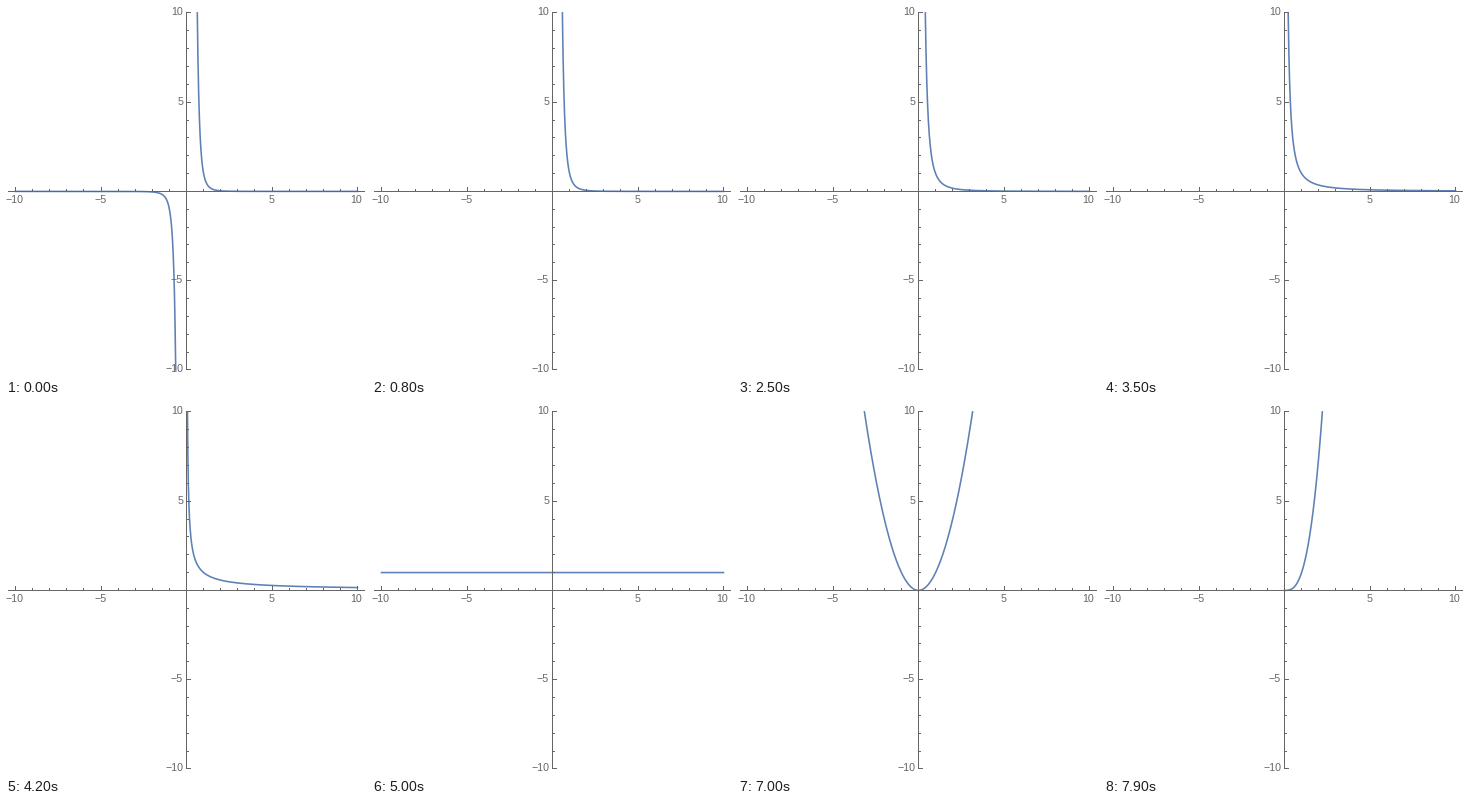
A matplotlib script for the animation above (8 s loop, 360 px wide and 371 px high).

```python
import numpy as np
import matplotlib.pyplot as plt
from matplotlib.animation import FuncAnimation

W, H, DPI = 360, 371, 100
PX = 72 / DPI                # points per pixel
CX, CY = 180.5, 185.4        # position of the coordinate origin
SX, SY = 17.1, 17.85         # pixels per unit
LIMIT = 10
FRAMES, INTERVAL = 80, 100
GRAY, BLUE = "#666666", "#5e81b5"

fig = plt.figure(figsize=(W / DPI, H / DPI), dpi=DPI, facecolor="white")
ax = fig.add_axes([0, 0, 1, 1])
ax.set(xlim=(0, W), ylim=(H, 0))
ax.axis("off")


def to_px(x, y):
    return CX + SX * x, CY - SY * y


def crisp(v):
    return np.floor(v) + 0.5


def rule(x0, y0, x1, y1):
    ax.plot([x0, x1], [y0, y1], color=GRAY, lw=PX, snap=False,
            solid_capstyle="butt", zorder=3)


def label(x, y, value, align):
    text = str(value).replace("-", "\u2212")
    ax.text(x, y, text, ha=align, va="baseline", color=GRAY,
            family="Liberation Sans", fontsize=10.6 * PX, zorder=4)


def draw_axes():
    ox, oy = crisp(CX), crisp(CY)
    rule(2, oy, 359, oy)
    rule(ox, 6, ox, 364)
    for k in range(-LIMIT, LIMIT + 1):
        if k == 0:
            continue
        px, py = map(crisp, to_px(k, k))
        major = k % 5 == 0
        size = 4.5 if major else 2.5
        rule(px, oy, px, oy - size)
        rule(ox, py, ox + size, py)
        if major:
            label(px - 1, 197, k, "center")
            label(177, py + 2.5, k, "right")


def power_curve(tenths):
    """Points of y = x^n inside the plot range, with n = tenths / 10."""
    n = tenths / 10
    low, high = 1e-12, LIMIT
    if n < 0:
        low = LIMIT ** (1 / n)
    elif n > 1:
        high = LIMIT ** (1 / n)
    x = np.geomspace(low, high, 900)
    y = x ** n
    # Negative x has a real value only for whole exponents.
    if tenths % 10 == 0:
        sign = -1 if (tenths // 10) % 2 else 1
        gap = [] if n >= 0 else [np.nan]
        x, y = (np.concatenate([-x[::-1], gap, x]),
                np.concatenate([sign * y[::-1], gap, y]))
    return to_px(x, y)


draw_axes()
curve, = ax.plot([], [], color=BLUE, lw=1.6 * PX, zorder=2, snap=False,
                 solid_capstyle="projecting", solid_joinstyle="round")


def update(i):
    curve.set_data(*power_curve(i - 50))
    return curve,


anim = FuncAnimation(fig, update, frames=FRAMES, interval=INTERVAL,
                     repeat=True, repeat_delay=0, blit=False)
plt.show()
```
